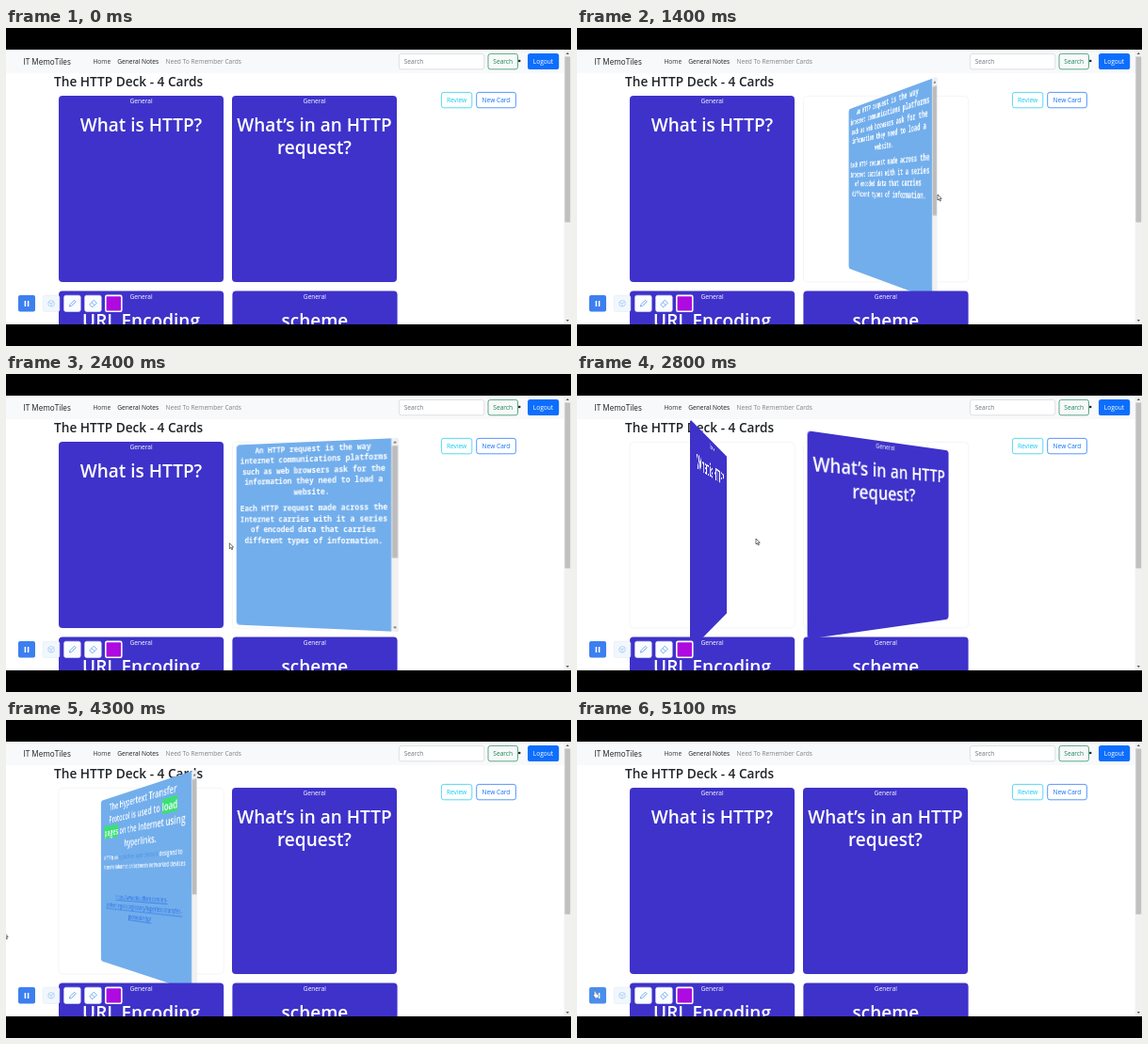
An HTML page for the animation above (5.2 s loop, 600x338 px).

```html
<!DOCTYPE html>
<html lang="en">
<head>
<meta charset="utf-8">
<title>Flash cards</title>
<style>
html, body { margin: 0; width: 100%; height: 100%; overflow: hidden; background: #fff; }
#stage { position: relative; width: 600px; height: 338px; overflow: hidden; background: #fff; }
svg { position: absolute; left: 0; top: 0; }
#stage, text { font-family: "Open Sans", "Noto Sans", sans-serif; }
text { font-size: 6.6px; white-space: pre; }
.mid { text-anchor: middle; }
.head { font-size: 19px; font-weight: 600; }
.face { position: absolute; top: 72.4px; width: 175.2px; height: 197.6px; border-radius: 4px; overflow: hidden; }
.left { left: 56px; }
.right { left: 240.4px; }
.front { background: #3e32ca; }
.back { background: #72aeec; }
.face text, .low text { fill: #fff; }
.face .link { fill: #2a70e4; text-decoration: underline; }
.mono text { font: bold 8.07px "Noto Sans Mono", "DejaVu Sans Mono", monospace; }
h3 { position: absolute; margin: 0; left: 0; top: 4.3px; width: 167.6px; text-align: center; white-space: nowrap;
  font-size: 11.4px; font-weight: 600; line-height: 14.75px; color: #fff; }
mark { background: #3cdf78; color: #fff; }
</style>
</head>
<body>
<div id="stage">
  <svg width="600" height="338">
    <rect y="23" width="593" height="25" fill="#f8f9fa"/>
    <text x="18.5" y="39" style="font-size:8.15px" fill="#1c1c1c">IT MemoTiles</text>
    <text x="92.5" y="38.4" fill="#333">Home</text>
    <text x="118.2" y="38.4" fill="#1c1c1c">General Notes</text>
    <text x="169.5" y="38.4" fill="#808182">Need To Remember Cards</text>
    <g fill="none" stroke-width=".7">
      <rect x="417.4" y="27.4" width="90.4" height="16.4" rx="2.4" fill="#fff" stroke="#ced4da"/>
      <rect x="512" y="27.4" width="31.5" height="16.4" rx="2.4" stroke="#198754"/>
      <rect x="462.4" y="68.4" width="32.4" height="16.4" rx="2.4" stroke="#0dcaf0"/>
      <rect x="499.7" y="68.4" width="41.7" height="16.4" rx="2.4" stroke="#0d6efd"/>
      <rect x="56" y="72.4" width="175.2" height="197.6" rx="4" stroke="#f1f1f1"/>
      <rect x="240.4" y="72.4" width="175.2" height="197.6" rx="4" stroke="#f1f1f1"/>
    </g>
    <rect x="554" y="27" width="33.2" height="17" rx="2.6" fill="#0d6efd"/>
    <circle cx="545.2" cy="35" r="1.3" fill="#212529"/>
    <text x="422.7" y="38.2" fill="#6c757d">Search</text>
    <text class="mid" x="527.7" y="38.2" fill="#198754">Search</text>
    <text class="mid" x="570.5" y="38.2" fill="#fff">Logout</text>
    <text class="mid" x="478.6" y="79.1" fill="#0dcaf0">Review</text>
    <text class="mid" x="520.5" y="79.1" fill="#0d6efd">New Card</text>
    <text x="51" y="62" style="font-size:13.65px;font-weight:600" fill="#212529">The HTTP Deck - 4 Cards</text>
  </svg>

  <div class="face front left">
    <svg width="176" height="198"><text class="mid" x="87.5" y="8.3">General</text>
      <text class="mid head" x="87.5" y="38.3">What is HTTP?</text></svg>
  </div>
  <div class="face back left">
    <h3>The Hypertext Transfer<br>Protocol is used to <mark>load</mark><br><mark>pages</mark> on the Internet using<br>hyperlinks.</h3>
    <svg width="176" height="198">
      <g font-weight="600">
        <text x="8" y="74.4" style="font-size:6.42px">HTTP is an <tspan fill="#4a90de" font-weight="400">application layer protocol</tspan> designed to</text>
        <text x="8" y="85" style="font-size:6.42px">transfer information between networked devices</text>
      </g>
      <text class="mid link" x="84" y="120">https://www.cloudflare.com/en-</text>
      <text class="mid link" x="84" y="130.5">gb/learning/ddos/glossary/hypertext-transfer-</text>
      <text class="mid link" x="84" y="141">protocol-http/</text>
      <rect x="167.8" width="7.4" height="198" fill="#f1f1f1"/>
      <rect x="168.6" y="7.6" width="5.8" height="103.5" fill="#bcbcbc"/>
      <path d="M169.8 5l1.7-2 1.7 2zM169.8 193l1.7 2 1.7-2z" fill="#555"/>
    </svg>
  </div>

  <div class="face front right">
    <svg width="176" height="198"><text class="mid" x="87.5" y="8.3">General</text>
      <text class="mid head" x="87.5" y="38.3">What’s in an HTTP</text>
      <text class="mid head" x="87.5" y="62.3">request?</text></svg>
  </div>
  <div class="face back right">
    <svg class="mono" width="176" height="198">
      <g class="mid">
        <text x="84.4" y="10.1">An HTTP request is the way</text>
        <text x="84.4" y="21.5">internet communications platforms</text>
        <text x="84.4" y="32.9">such as web browsers ask for the</text>
        <text x="84.4" y="44.3">information they need to load a</text>
        <text x="84.4" y="55.7">website.</text>
        <text x="84.4" y="73.4">Each HTTP request made across the</text>
        <text x="84.4" y="84.9">Internet carries with it a series</text>
        <text x="84.4" y="96.4">of encoded data that carries</text>
        <text x="84.4" y="107.9">different types of information.</text>
      </g>
      <rect x="167.8" width="7.4" height="198" fill="#f1f1f1"/>
      <rect x="168.6" y="7.6" width="5.8" height="115" fill="#bcbcbc"/>
      <path d="M169.8 5l1.7-2 1.7 2zM169.8 193l1.7 2 1.7-2z" fill="#555"/>
    </svg>
  </div>

  <svg width="600" height="338">
    <g class="low">
      <rect x="56" y="279.5" width="175.2" height="60" rx="4" fill="#3e32ca"/>
      <rect x="240.4" y="279.5" width="175.2" height="60" rx="4" fill="#3e32ca"/>
      <text class="mid" x="143.5" y="287.8">General</text>
      <text class="mid" x="327.9" y="287.8">General</text>
      <text class="mid head" x="143.5" y="317.5">URL Encoding</text>
      <text class="mid head" x="327.9" y="317.5">scheme</text>
    </g>
    <rect x="592.6" y="23" width="7.4" height="292" fill="#f1f1f1"/>
    <rect x="593.4" y="30.5" width="5.8" height="176" fill="#c1c1c1"/>
    <path d="M594.6 28l1.7-2 1.7 2zM594.6 310l1.7 2 1.7-2z" fill="#555"/>

    <rect id="pause" x="13" y="284" width="18" height="17.6" rx="2"/>
    <path d="M20.4 290v6M23.6 290v6" stroke="#fff" stroke-width="1.5"/>
    <g stroke="#e1ebf5" stroke-width=".6">
      <rect x="39.2" y="284.2" width="17.6" height="17.2" rx="2" fill="#f1f7fd"/>
      <rect x="61.6" y="284.2" width="17.6" height="17.2" rx="2" fill="#fafcff"/>
      <rect x="83.6" y="284.2" width="17.6" height="17.2" rx="2" fill="#fafcff"/>
    </g>
    <g fill="none" stroke="#5b9cea" stroke-width=".8">
      <g stroke="#a3cdf3"><circle cx="48" cy="292.8" r="3.3"/><path d="M45 291.5l3 1.3 2.6-1.8M48 292.8v3"/></g>
      <path d="M67.4 296l.6-2.2 4.6-4.6 1.6 1.6-4.6 4.6z"/>
      <path d="M88.8 293.8l4.4-4.6 3.2 3-4.2 4.3h-1.2zM91 291.6l3.1 3"/>
    </g>
    <rect x="105.8" y="284.4" width="17" height="16.8" rx="1.5" fill="#ad0be0" stroke="#fff" stroke-width="1.6"/>

    <path id="arrow" d="M0 0V6L1.4 4.8 2.4 7 3.4 6.6 2.4 4.4H4.2Z" fill="#fff" stroke="#111" stroke-width=".6"/>
    <path id="hand" d="M1 0c.8 0 1 .5 1 1v2l2 .5c.8.3 1 .8.9 1.5l-.4 2.5h-3L-.6 4.6c-.4-.7.3-1 .8-.6V1C.2.4.5 0 1 0Z" fill="#fff" stroke="#234" stroke-width=".4"/>
    <path d="M0 0H600V23H0ZM0 315H600V338H0Z"/>
  </svg>
</div>
<script>
const LOOP = 5200, STEP = 100, FLIP = 900;
const $ = s => document.querySelector(s);

// Time at which each card turns over and turns back
const cards = [['left', 2566, 4115], ['right', 1045, 2332]].map(([side, over, back]) => ({
  over, back, front: $('.front.' + side), rear: $('.back.' + side)
}));

// Pointer: time, x, y
const path = [
  [800, 560, 215], [1000, 440, 188], [1100, 383, 177], [2150, 383, 177], [2330, 240, 180],
  [2566, 231, 179], [2700, 190, 175], [3950, 190, 175], [4115, 56, 205], [4300, -2, 226],
  [4500, 0, 250], [4900, 18, 288], [5200, 18, 288]
];

const bez = (a, b, u) => 3 * a * u * (1 - u) ** 2 + 3 * b * u * u * (1 - u) + u ** 3;

// The CSS "ease" curve
function ease(x) {
  if (x <= 0) return 0;
  if (x >= 1) return 1;
  let lo = 0, hi = 1;
  for (let i = 0; i < 24; i++) {
    const m = (lo + hi) / 2;
    if (bez(.25, .25, m) < x) lo = m; else hi = m;
  }
  return bez(.1, 1, lo);
}

function pointAt(t) {
  const i = path.findIndex(p => p[0] > t);
  if (i < 1) return null;
  const [t0, x0, y0] = path[i - 1], [t1, x1, y1] = path[i];
  const k = (t - t0) / (t1 - t0);
  return [x0 + (x1 - x0) * k, y0 + (y1 - y0) * k];
}

function turn(el, deg) {
  el.style.transform = `perspective(439px) rotateY(${deg}deg)`;
  el.style.visibility = Math.abs(deg) < 90 ? 'visible' : 'hidden';
}

function draw(t) {
  for (const c of cards) {
    const deg = 180 * (ease((t - c.over) / FLIP) - ease((t - c.back) / FLIP));
    turn(c.front, deg);
    turn(c.rear, deg - 180);
  }
  const p = pointAt(t), onPause = t >= 4900;
  $('#pause').setAttribute('fill', onPause ? '#4a8eec' : '#3c7ff0');
  for (const [id, on] of [['#arrow', !onPause], ['#hand', onPause]]) {
    const el = $(id);
    el.style.display = p && on ? '' : 'none';
    if (p) el.setAttribute('transform', `translate(${p})`);
  }
}

const start = performance.now();
function tick() {
  const t = (performance.now() - start) % LOOP;
  draw(Math.floor(t / STEP) * STEP);
  requestAnimationFrame(tick);
}
tick();
</script>
</body>
</html>
```
